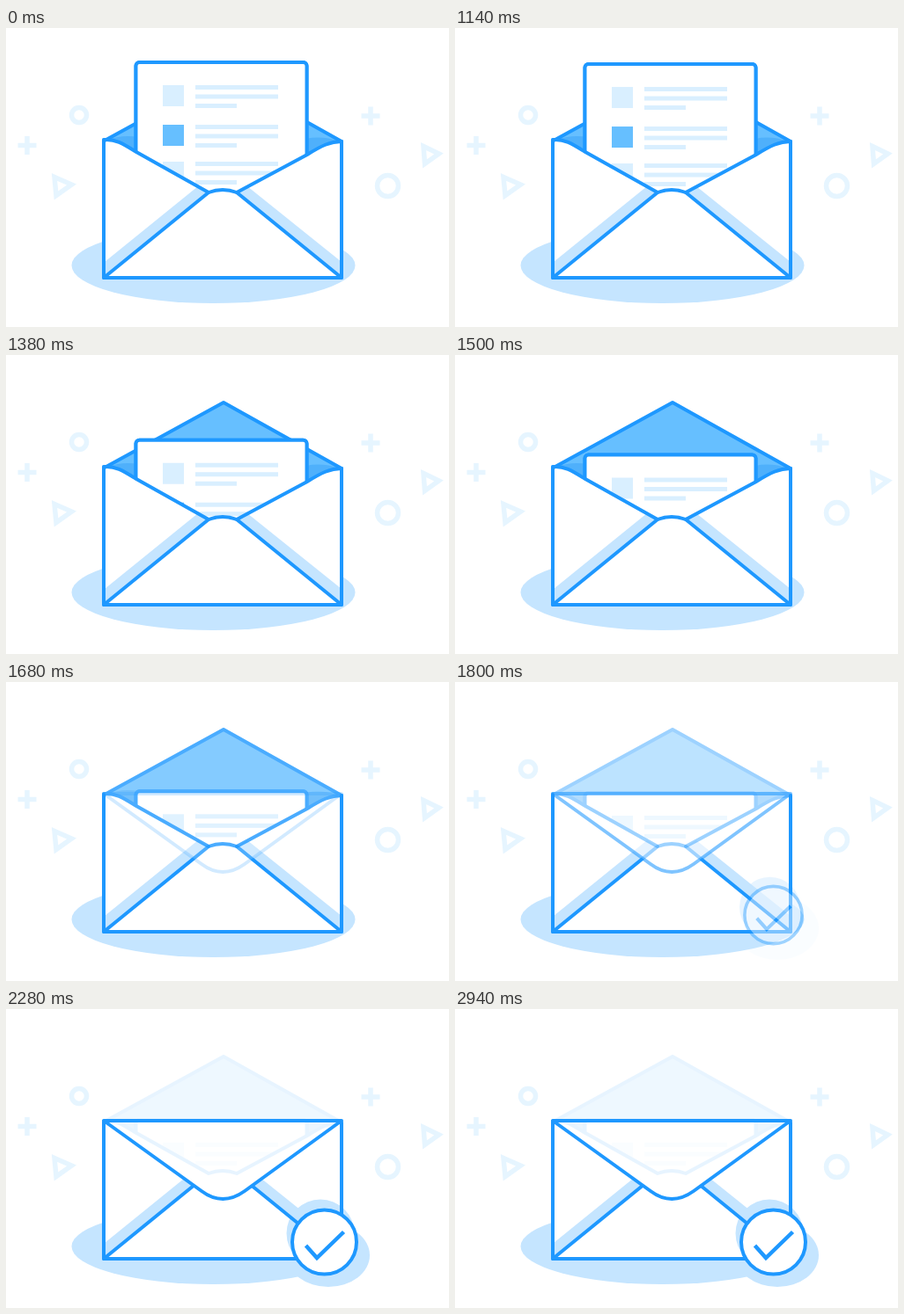
Recreate the animation shown at these times as an HTML page. Size 503 px wide and 340 px high, loop 3060 ms.

```html
<!DOCTYPE html>
<html lang="en">
<head>
<meta charset="utf-8">
<title>Letter sent</title>
<style>
  html, body { margin: 0; width: 100%; height: 100%; overflow: hidden; background: #fff; }
  svg { display: block; }
  .line { fill: none; stroke: #1e98ff; stroke-width: 4; stroke-linecap: round; stroke-linejoin: round; }
  .white { fill: #fff; }
  .shade { fill: #c5e5ff; }
  .pale { fill: #d9efff; }
  .blue { fill: #66bfff; }
  .confetti { fill: none; stroke: #e6f5ff; stroke-width: 5.5; }
</style>
</head>
<body>
<svg width="503" height="340" viewBox="0 0 503 340">
  <defs>
    <clipPath id="pocket">
      <path d="M112 0V127C124 126 132 131 148 141L230 187Q246 181 262 187L342 144C358 134 368 129 381 129V0Z"/>
    </clipPath>
  </defs>

  <g class="confetti">
    <circle cx="83" cy="99" r="8.5"/>
    <circle cx="433.500" cy="179.500" r="12"/>
    <path d="M13.500 133.500h21M24 123v21M403.500 100h21M414 89.500v21"/>
    <path d="M55 169.500L74.500 178L57 190.500ZM474 134.500L491.500 143L475.500 154.500Z"/>
  </g>

  <ellipse class="shade" cx="235.500" cy="270" rx="161" ry="43"/>
  <ellipse id="badgeShadow" class="shade" cx="366" cy="280" rx="47" ry="36"/>

  <path class="white" d="M111 127H381V284H111Z"/>
  <path class="shade" d="M112 266L218 180L230 187L112 284ZM381 266L274 180L262 187L381 284Z"/>
  <circle id="halo" class="shade" r="38.500" cx="-4.500" cy="-10"/>
  <path class="line" d="M111 284L230 187M262 187L381 284"/>
  <path id="flapFill" class="white" d="M112 127L222 207Q246 225 271 207L381 127Z"/>
  <path class="line" d="M111 128V284H381V129"/>

  <g id="open">
    <g clip-path="url(#pocket)">
      <path class="blue" d="M112 128L247 54L381 129L262 190H230Z"/>
      <path fill="#4fb0fb" d="M116 127Q132 121 150 124V144ZM378 129Q360 122 340 126V146Z"/>
      <g id="letter">
        <rect class="line" x="147.500" y="0" width="194" height="190" rx="4" style="fill:#fff"/>
        <g id="rows"></g>
      </g>
    </g>
    <path id="roof" class="line" d="M112 128L247 54L381 129"/>
    <g clip-path="url(#pocket)"><use href="#letter"/></g>
    <path class="line" d="M111 127C124 126 132 131 148 141L230 187Q246 181 262 187L342 144C358 134 368 129 381 129"/>
  </g>

  <path id="flapLine" class="line" d="M111 127H381L271 207Q246 225 222 207Z"/>

  <g id="badge">
    <circle class="line" r="36.500" style="fill:#fff"/>
    <path class="line" d="M-21 4L-8.500 18L22 -11.500" style="stroke-width:4.500;stroke-linecap:butt;stroke-linejoin:miter"/>
  </g>
</svg>
<script>
const LOOP = 3060, STEP = 60;
const el = id => document.getElementById(id);
const fade = (id, o) => el(id).setAttribute('opacity', o);
const place = (id, transform) => el(id).setAttribute('transform', transform);

// Three blocks of text lines, each beside a square
const bar = (x, y, w, h, cls) =>
  `<rect class="${cls}" x="${x}" y="${y}" width="${w}" height="${h}"/>`;
el('rows').innerHTML = [26, 71, 113].map((y, i) =>
  bar(178, y, 24, 24, i === 1 ? 'blue' : 'pale') +
  [94, 94, 47].map((w, j) => bar(215, y + j * 10.5, w, 5, 'pale')).join('')
).join('');

// Standard "ease" timing curve: cubic-bezier(.25, .1, .25, 1)
function ease(t) {
  if (t <= 0) return 0;
  if (t >= 1) return 1;
  const curve = (u, a, b) => 3 * a * u * (1 - u) ** 2 + 3 * b * u * u * (1 - u) + u ** 3;
  let lo = 0, hi = 1;
  for (let i = 0; i < 24; i++) {
    const mid = (lo + hi) / 2;
    if (curve(mid, .25, .25) < t) lo = mid; else hi = mid;
  }
  return curve(lo, .1, 1);
}

function draw(t) {
  const slide = ease((t - 1113) / 690);
  const close = ease((t - 1570) / 700);
  const pop = ease((t - 1680) / 600);

  place('letter', `translate(0 ${39 + 87 * slide})`);
  // A faint trace of the open envelope stays visible
  fade('open', Math.max(1 - close, .1));
  fade('flapFill', close);
  fade('flapLine', close);

  const spot = `translate(361.500 265) scale(${.85 + .15 * pop})`;
  const solid = Math.min(1, pop * 1.4);
  place('badge', spot);
  place('halo', spot);
  fade('badge', solid);
  fade('halo', solid);
  fade('badgeShadow', pop * pop);
}

const start = performance.now();
function tick() {
  const t = (performance.now() - start) % LOOP;
  draw(Math.floor(t / STEP) * STEP);
  requestAnimationFrame(tick);
}
tick();
</script>
</body>
</html>
```
